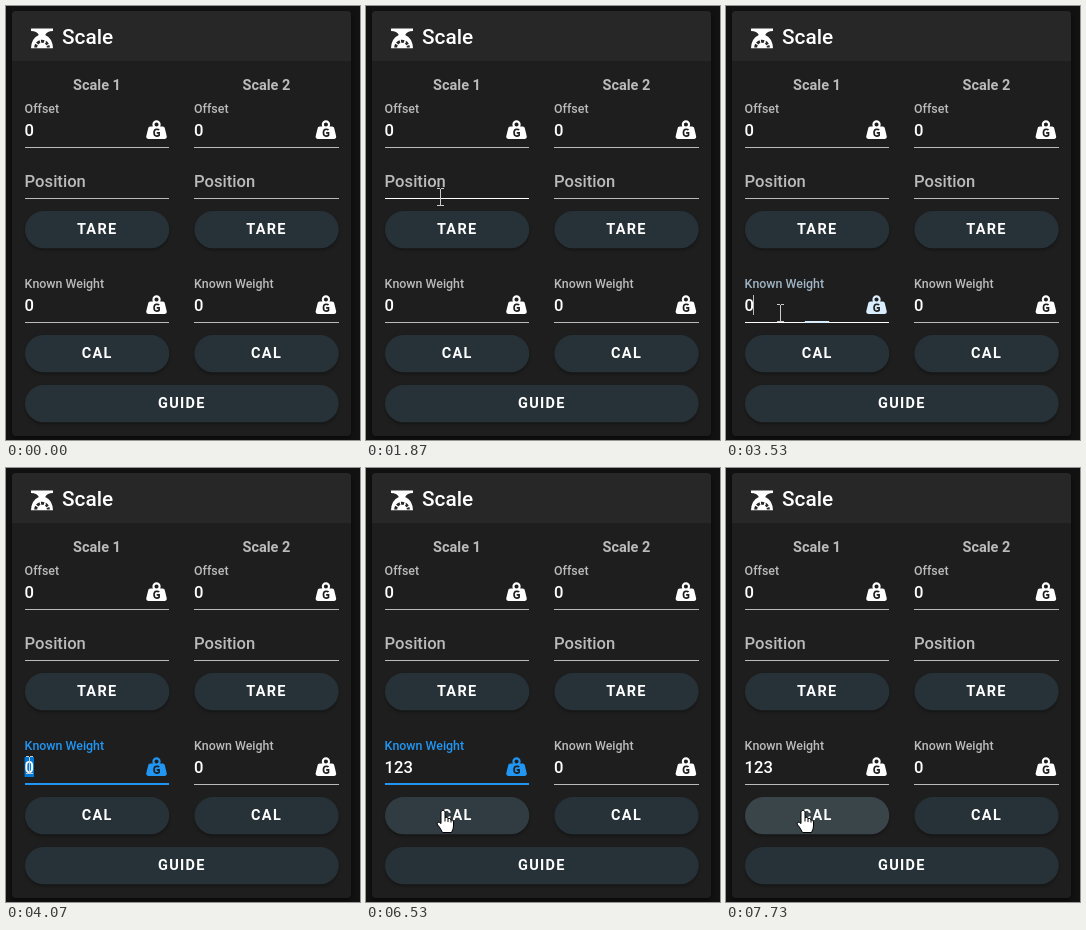
Write an HTML page with a canvas that moves like this. It is 354x434 px and loops after 8 s.

```html
<!DOCTYPE html>
<html lang="en">
<head>
<meta charset="utf-8">
<title>Scale panel</title>
<style>
  html, body { margin: 0; width: 100%; height: 100%; overflow: hidden; background: #121212; }
  canvas { display: block; width: 354px; height: 434px; }
</style>
</head>
<body>
<canvas id="stage"></canvas>
<script>
const W = 354, H = 434, LOOP = 8000, STEP = 1000 / 15;
const COL = 169.4, LEFT = 18.6, FIELD_W = 144.3;
const CARD = '#1e1e1e', MUTED = '#bbb';
const WHITE = [255, 255, 255], GREY = [187, 187, 187], BLUE = [33, 150, 243];

const canvas = document.getElementById('stage');
const ctx = canvas.getContext('2d');
const dpr = window.devicePixelRatio || 1;
canvas.width = W * dpr;
canvas.height = H * dpr;

// Pointer hotspot: time, x, y
const PATH = [
  [0, 370, 415], [466, 370, 415], [467, 353, 415], [532, 353, 415], [533, 370, 415],
  [666, 370, 415], [667, 350, 412], [733, 338, 370], [867, 270, 300], [1000, 190, 248],
  [1133, 153, 228], [1267, 153, 228], [1333, 138, 220], [1533, 80, 180], [1667, 66, 162],
  [1933, 76, 201], [2000, 76, 201], [2067, 72, 212], [2867, 72, 212], [3000, 64, 262],
  [3200, 54, 313], [3400, 54, 313], [3467, 54, 307], [3533, 54, 307], [3733, 30, 300],
  [3867, 18, 297], [4067, 23, 297], [6267, 23, 297], [6333, 32, 318], [6400, 52, 334],
  [6533, 77, 342]
];

// hoverAt: when the highlight starts to fade in; press: when the ripple starts
const BUTTONS = [
  { text: 'TARE', x: 19, y: 205, w: 144.3, hoverAt: 1200, press: 2677, fromX: 72, fromY: 212 },
  { text: 'TARE', x: 188.4, y: 205, w: 144.3 },
  { text: 'CAL', x: 19, y: 329, w: 144.3, hoverAt: 6300, press: 7137, fromX: 77, fromY: 342 },
  { text: 'CAL', x: 188.4, y: 329, w: 144.3 },
  { text: 'GUIDE', x: 19, y: 379, w: 313.7 }
];
const BTN_H = 37.3;

// Hover zones of the three field rows: top, bottom, underline
const ROWS = [[96, 146, 141], [153, 204, 192], [271, 322, 316]];

const WEIGHT = new Path2D('M12 3A4 4 0 0 1 16 7C16 7.7 15.8 8.4 15.5 9H18C19 9 19.8 9.7 20 10.6C22 18.6 22 18.8 22 19A2 2 0 0 1 20 21H4A2 2 0 0 1 2 19C2 18.8 2 18.6 4 10.6C4.2 9.7 5 9 6 9H8.5C8.2 8.4 8 7.7 8 7A4 4 0 0 1 12 3M12 5A2 2 0 0 0 10 7A2 2 0 0 0 12 9A2 2 0 0 0 14 7A2 2 0 0 0 12 5Z');
const LETTER = new Path2D('M14.5 12.4Q14 11.6 12.2 11.6Q9.6 11.6 9.6 14.9Q9.6 18.3 12.2 18.3Q13.8 18.3 14.5 17.6V15.2H12.2');
const HAND = new Path2D('M-2 1.5Q0 -1.5 2 1.5V7.5Q4.5 6.3 5 8.7Q7.3 7.5 8 10Q10.5 9.2 10.5 12V16Q10.5 19 8.5 22.5H-.5Q-2.5 18 -6 14Q-5.6 10.8 -2 13.5Z');
const KNUCKLES = new Path2D('M2 7.5V11.5M5 8.7V12M8 10V12.5');
const ARROW = new Path2D('M0 0V14.5L3.4 11.5L5.6 16.3L7.8 15.3L5.7 10.7H10.3Z');

const clamp = v => Math.min(1, Math.max(0, v));
const smooth = v => { v = clamp(v); return v * v * (3 - 2 * v); };
const lerp = (a, b, k) => a + (b - a) * k;
const mix = (a, b, k) => `rgb(${a.map((v, i) => Math.round(lerp(v, b[i], k)))})`;
const white = a => `rgba(255,255,255,${a})`;

function rect(x, y, w, h, color) {
  ctx.fillStyle = color;
  ctx.fillRect(x, y, w, h);
}

function round(x, y, w, h, r) {
  ctx.beginPath();
  ctx.roundRect(x, y, w, h, r);
}

function shadow(color, blur, dy) {
  ctx.shadowColor = color;
  ctx.shadowBlur = blur * dpr;
  ctx.shadowOffsetY = dy * dpr;
}

function label(text, x, y, size, color, weight = 500, align = 'left', spacing = 0) {
  ctx.font = `${weight} ${size}px Roboto, sans-serif`;
  ctx.letterSpacing = spacing + 'px';
  ctx.textAlign = align;
  ctx.fillStyle = color;
  ctx.fillText(text, x, y);
}

function pointerAt(t) {
  let i = PATH.length - 1;
  while (i > 0 && PATH[i][0] > t + 0.5) i--;
  const a = PATH[i], b = PATH[i + 1] || a;
  const k = b === a ? 0 : clamp((t - a[0]) / (b[0] - a[0]));
  return { x: lerp(a[1], b[1], k), y: lerp(a[2], b[2], k) };
}

const overButton = (b, p) => p.x >= b.x && p.x <= b.x + b.w && p.y >= b.y && p.y <= b.y + BTN_H;

function overField(col, row, p) {
  const x = 19 + col * COL;
  return p.x >= x - 2 && p.x <= x + FIELD_W && p.y >= ROWS[row][0] && p.y < ROWS[row][1];
}

function weightIcon(x, y, color) {
  ctx.save();
  ctx.translate(x, y);
  ctx.scale(1.035, 1.035);
  ctx.fillStyle = color;
  ctx.fill(WEIGHT, 'evenodd');
  ctx.strokeStyle = CARD;
  ctx.lineWidth = 1.6;
  ctx.stroke(LETTER);
  ctx.restore();
}

function scaleIcon() {
  ctx.save();
  ctx.fillStyle = '#fff';
  ctx.fill(new Path2D('M25 22.5H47V25Q41 25.2 39.2 29Q46.5 32 47 42.3H25Q25.5 32 32.8 29Q31 25.2 25 25Z'));
  ctx.strokeStyle = '#272727';
  ctx.lineWidth = 3;
  ctx.setLineDash([3.2, 1.1]);
  ctx.beginPath();
  ctx.arc(36, 41.5, 6.3, Math.PI, 0);
  ctx.stroke();
  ctx.setLineDash([]);
  ctx.strokeStyle = '#fff';
  ctx.lineWidth = 1.4;
  ctx.stroke(new Path2D('M36 41L39.5 35.5'));
  ctx.restore();
}

function drawCard() {
  rect(0, 0, W, H, '#121212');
  ctx.save();
  shadow('rgba(0,0,0,.55)', 5, 2);
  round(6, 5, 339, 425, 4);
  ctx.fillStyle = CARD;
  ctx.fill();
  ctx.restore();
  round(6, 5, 339, 50, [4, 4, 0, 0]);
  ctx.fillStyle = '#272727';
  ctx.fill();
  scaleIcon();
  label('Scale', 56, 38.3, 20.8, '#fff');
}

function drawButton(b, p, t) {
  const cx = b.x + b.w / 2, cy = b.y + BTN_H / 2;
  ctx.save();
  shadow('rgba(0,0,0,.3)', 3, 2);
  round(b.x, b.y, b.w, BTN_H, BTN_H / 2);
  ctx.fillStyle = '#263238';
  ctx.fill();
  ctx.restore();

  const age = b.press ? t - b.press : -1;
  if (b.hoverAt && overButton(b, p)) {
    ctx.fillStyle = white(age >= 0 ? 0.09 : 0.05 * clamp((t - b.hoverAt) / 200));
    ctx.fill();
  }
  label(b.text, cx, cy + 4.3, 14.5, '#fff', 700, 'center', 1.3);

  if (age >= 0 && age < 540) {
    const k = 1 - (1 - clamp(age / 300)) ** 3;
    const r = Math.hypot(b.w, BTN_H) / 2 * lerp(0.3, 1, k);
    ctx.save();
    round(b.x, b.y, b.w, BTN_H, BTN_H / 2);
    ctx.clip();
    ctx.beginPath();
    ctx.arc(lerp(b.fromX, cx, k), lerp(b.fromY, cy, k), r, 0, 7);
    ctx.fillStyle = white(0.25 * (1 - clamp((age - 300) / 240)));
    ctx.fill();
    ctx.restore();
  }
}

function typedValue(t) {
  return t < 5190 ? '0' : t < 5460 ? '1' : t < 5790 ? '12' : '123';
}

function drawUnderline(col, row, p, focus = 0) {
  const y = ROWS[row][2], x = Math.round(19 + col * COL);
  const w = Math.round(19 + col * COL + FIELD_W) - x;
  rect(x, y, w, 1, overField(col, row, p) ? '#fff' : MUTED);
  if (focus > 0) {
    const lit = w * focus;
    rect(x + (w - lit) / 2, y - 1, lit, 2, mix(WHITE, BLUE, focus));
  }
}

function drawValueField(col, row, name, value, p, focus) {
  const x = LEFT + col * COL, line = ROWS[row][2];
  label(name, x, line - 34, 12.4, mix(GREY, BLUE, focus));
  label(value, x, line - 10.8, 16.6, '#fff');
  weightIcon(x + 119.5, line - 29.8, mix(WHITE, BLUE, focus));
  drawUnderline(col, row, p, focus);
}

function drawEditing(t, value) {
  if (t > 4000 && t < 5190) {
    rect(LEFT, 289, 9.4, 20, '#0078d7');
    label('0', LEFT, 305.2, 16.6, '#fff');
    return;
  }
  const typing = t > 3460 && t < 6320;
  const blinkOn = t > 6860 && t < 7140;
  if (typing || blinkOn) rect(Math.floor(LEFT + value.length * 9.33), 289, 1, 20, MUTED);
}

function drawSuggestion() {
  ctx.save();
  shadow('rgba(0,0,0,.5)', 4, 1);
  round(18, 315, 203, 55.5, [0, 0, 4, 4]);
  ctx.fillStyle = '#292a2d';
  ctx.fill();
  ctx.restore();
  label('100', 30.5, 347, 12.6, '#fff', 700);
}

function drawPointer(p) {
  const onButton = BUTTONS.some(b => overButton(b, p));
  const onField = [0, 1].some(c => ROWS.some((_, r) => overField(c, r, p)));
  ctx.save();
  ctx.translate(Math.round(p.x), Math.round(p.y));
  if (onField && !onButton) {
    rect(0, -8, 1, 17, '#ccc');
    for (const y of [-9, 8]) {
      rect(-3, y, 3, 1, '#ccc');
      rect(1, y, 3, 1, '#ccc');
    }
  } else {
    const shape = onButton ? HAND : ARROW;
    ctx.fillStyle = '#fff';
    ctx.strokeStyle = '#000';
    ctx.lineWidth = 1;
    ctx.lineJoin = 'round';
    ctx.fill(shape);
    ctx.stroke(shape);
    if (onButton) ctx.stroke(KNUCKLES);
  }
  ctx.restore();
}

function draw(t) {
  ctx.setTransform(dpr, 0, 0, dpr, 0, 0);
  const p = pointerAt(t);
  const focus = smooth((t - 3455) / 300) - smooth((t - 7140) / 300);
  const value = typedValue(t);

  drawCard();
  for (const col of [0, 1]) {
    label('Scale ' + (col + 1), 91 + col * COL, 84, 14.5, MUTED, 700, 'center');
    drawValueField(col, 0, 'Offset', '0', p, 0);
    label('Position', LEFT + col * COL, 181, 16.6, MUTED);
    drawUnderline(col, 1, p);
    drawValueField(col, 2, 'Known Weight', col ? '0' : value, p, col ? 0 : focus);
  }
  BUTTONS.forEach(b => drawButton(b, p, t));
  drawEditing(t, value);
  if (t > 5190 && t < 5460) drawSuggestion();
  drawPointer(p);
}

// The picture advances at 15 steps per second
function tick() {
  const t = performance.now() % LOOP;
  draw(Math.floor((t + 4) / STEP) * STEP);
  requestAnimationFrame(tick);
}
tick();
</script>
</body>
</html>
```
